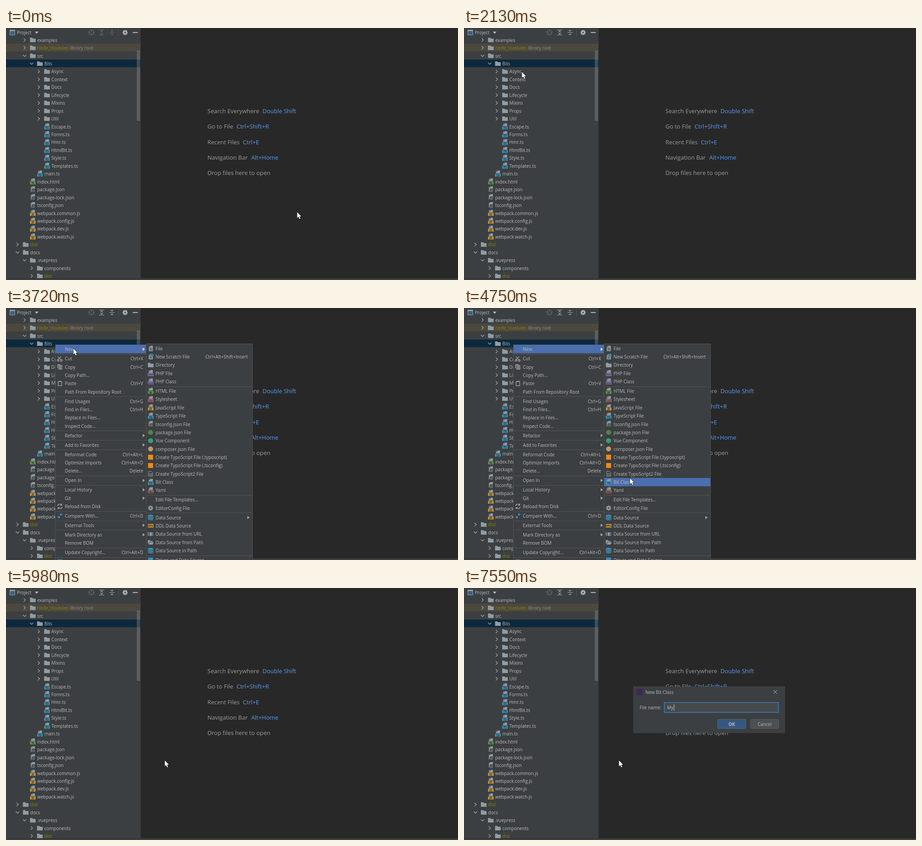
An HTML page with a canvas for the animation above (8000 ms loop, 1002 px wide and 559 px high).

```html
<!DOCTYPE html>
<html lang="en">
<head>
<meta charset="utf-8">
<title>New class from the project tree</title>
<style>
html, body { margin: 0; width: 100%; height: 100%; overflow: hidden; background: #282828; }
canvas { display: block; }
</style>
</head>
<body>
<canvas id="stage" width="1002" height="559"></canvas>
<script>
const ctx = document.getElementById('stage').getContext('2d');
const LOOP = 8000;
const PANEL = '#3c3f41', LINE = '#515354', TEXT = '#bbbbbb', GREY = '#919da5', OLIVE = '#848504';
const BLUE = '#3c8fb5', GOLD = '#c2923c', GREEN = '#5b8f45', RED = '#b0656b', VIOLET = '#8d7bb5', SELECT = '#4b6eaf';

function box(x, y, w, h, color) {
  ctx.fillStyle = color;
  ctx.fillRect(x, y, w, h);
}

function text(str, x, y, color = TEXT, { size = 10, align = 'left', weight = 400 } = {}) {
  ctx.font = `${weight} ${size}px "Open Sans", "Noto Sans", sans-serif`;
  ctx.textAlign = align;
  ctx.fillStyle = color;
  ctx.fillText(str, x, Math.round(y));
}

function fill(x, y, d, color) {
  ctx.save();
  ctx.translate(x, y);
  ctx.fillStyle = color;
  ctx.fill(new Path2D(d));
  ctx.restore();
}

function stroke(x, y, d, color = '#afb1b3', width = 1.2) {
  ctx.save();
  ctx.translate(x, y);
  ctx.strokeStyle = color;
  ctx.lineWidth = width;
  ctx.stroke(new Path2D(d));
  ctx.restore();
}

function disc(x, y, r, color) {
  ctx.fillStyle = color;
  ctx.beginPath();
  ctx.arc(x, y, r, 0, 7);
  ctx.fill();
}

// Icons: x is the left edge, y the middle of the row.
const folder = (x, y) => fill(x, y, 'M0-5h5l1.5 2h6v8h-12.5z', GREY);
const page = (x, y) => fill(x, y, 'M5-6h6v12h-9v-9h3zM4-6v2h-2z', GREY);

const badge = (label, color) => (x, y) => {
  fill(x, y, 'M5-7h6v6h-9v-3h3zM4-7v2.6h-2.6z', GREY);
  box(x, y - .3, 12.5, 6.6, color);
  text(label, x + 6.3, y + 5.4, '#263138', { size: label.length > 2 ? 5.5 : 6.5, align: 'center', weight: 700 });
};

function json(x, y) {
  fill(x, y, 'M5-7h6v6h-9v-3h3zM4-7v2.6h-2.6zM2-1h2v6h-2z', GREY);
  disc(x + 8, y + 2.3, 4.4, PANEL);
  text('{}', x + 8, y + 4.8, GREY, { size: 7.5, align: 'center', weight: 700 });
}

function lines(x, y) {
  page(x, y);
  for (const dy of [-1, 1, 3]) box(x + 4, y + dy, 5, 1, PANEL);
}

function clockPage(x, y) {
  lines(x, y);
  disc(x + 9, y - 3, 3.6, BLUE);
  stroke(x + 9, y - 3, 'M0-2v2h2', PANEL, 1);
}

function cylinder(x, y) {
  fill(x, y, 'M0-4c0-3 12-3 12 0v8c0 3-12 3-12 0z', BLUE);
  for (const dy of [-3, 0, 3]) stroke(x, y + dy, 'M0 0c0 2 12 2 12 0', PANEL, .9);
}

function gear(x, y, color = GREY) {
  for (let i = 0; i < 4; i++) {
    ctx.save();
    ctx.translate(x + 6, y);
    ctx.rotate(i * Math.PI / 4);
    box(-1.2, -5.7, 2.4, 11.4, color);
    ctx.restore();
  }
  disc(x + 6, y, 4.2, color);
  disc(x + 6, y, 1.8, PANEL);
}

const square = color => (x, y) => box(x + .5, y - 5.5, 11, 11, color);
const dot = color => (x, y) => disc(x + 6, y, 5.6, color);
const outline = (d, color, width) => (x, y) => stroke(x, y, d, color, width);

const TS = badge('TS', BLUE), JS = badge('JS', GOLD), HTML = badge('H', GREEN), PHP = badge('PHP', VIOLET);

function fileIcon(name) {
  if (name.endsWith('.ts')) return TS;
  if (name.endsWith('.js')) return JS;
  return name.endsWith('.json') ? json : HTML;
}

const icons = {
  'Cut': outline('M1-5l8 8M1 3l8-8M2 2a2 2 0 1 0 .1 0M9 2a2 2 0 1 0 .1 0'),
  'Copy': outline('M1 3v-8h7M3.5-3h7v8h-7zM5-1h4M5 1h4M5 3h4'),
  'Paste': outline('M2-4h8v9h-8zM4-5h4'),
  'Reload from Disk': outline('M1-1a5 5 0 0 1 9-2M10-6v3.5h-3.5M11 1a5 5 0 0 1-9 2M2 6v-3.5h3.5'),
  'Compare With...': outline('M0 3h5M3 .5l2.5 2.5l-2.5 2.5M12-3h-5M9-5.5l-2.5 2.5l2.5 2.5', '#3e97c4', 1.5),
  'Diagrams': square(BLUE),
  'File': lines,
  'New Scratch File': clockPage,
  'Directory': folder,
  'PHP File': PHP,
  'PHP Class': PHP,
  'HTML File': HTML,
  'Stylesheet': badge('CSS', RED),
  'JavaScript File': JS,
  'TypeScript File': TS,
  'tsconfig.json File': json,
  'package.json File': dot('#4d8546'),
  'Vue Component': dot('#3a9b78'),
  'composer.json File': dot('#b99a72'),
  'Create TypoScript File (.typoscript)': square('#e88c1c'),
  'Create TypoScript File (.tsconfig)': square('#e88c1c'),
  'Create TypoScript2 File': (x, y) => {
    stroke(x, y, 'M1.5-5.5h6l3 3v8h-9z', GREY, 1);
    text('TS', x + 6, y + 4, '#d0837a', { size: 6.5, align: 'center', weight: 700 });
  },
  'Bit Class': TS,
  'Yaml': badge('YML', RED),
  'EditorConfig File': gear,
  'Data Source': cylinder,
  'DDL Data Source': (x, y) => {
    box(x, y - 4, 12.5, 8, GOLD);
    text('DDL', x + 6.3, y + 2.4, '#30291a', { size: 6, align: 'center', weight: 700 });
  },
  'Data Source from URL': (x, y) => {
    box(x, y - 4, 2, 8, GREY);
    fill(x, y, 'M4-4h4v8h-4zM8-3h4v2h-4zM8 1h4v2h-4z', GREY);
  },
  'Data Source from Path': (x, y) => fill(x, y, 'M0-5h4l1.5 2h5v2h-7l-2 4h-1.5zM4 0h9l-2.5 5h-9z', GREY),
  'Data Source in Path': cylinder,
  'Driver and Data Source': square(BLUE)
};

// Tree rows: depth, arrow (> closed, v open, . none), name.
const tree = `1>examples|1>node_modules|1vsrc|2vBits|3>Async|3>Context|3>Docs|3>Lifecycle|3>Mixins|3>Props|3>Util
|3.Escape.ts|3.Forms.ts|3.Hmr.ts|3.HtmlBit.ts|3.Style.ts|3.Templates.ts|2.main.ts|1.index.html|1.package.json
|1.package-lock.json|1.tsconfig.json|1.webpack.common.js|1.webpack.config.js|1.webpack.dev.js|1.webpack.watch.js
|0>dist|0vdocs|1v.vuepress|2>components|2>dist`.replace(/\n/g, '').split('|');

// Menu entries: label, optional =shortcut, > for a submenu, - for a separator.
function layout(list, y) {
  const rows = [];
  for (const item of list.replace(/\n/g, '').split('|')) {
    if (item === '-') {
      rows.push({ line: y - 7.9 });
      y += 2.6;
    } else {
      const [label, keys] = item.replace('>', '').split('=');
      rows.push({ y, label, keys, more: item.endsWith('>') });
      y += 18.36;
    }
  }
  return rows;
}

const contextRows = layout(`New>|-|Cut=Ctrl+X|Copy=Ctrl+C|Copy Path...|Paste=Ctrl+V|Path From Repository Root|-
|Find Usages=Ctrl+G|Find in Files...=Ctrl+H|Replace in Files...|Inspect Code...|-|Refactor>|-|Add to Favorites>|-
|Reformat Code=Ctrl+Alt+L|Optimize Imports=Ctrl+Alt+O|Delete...=Delete|-|Open In>|-|Local History>|Git>
|Reload from Disk|-|Compare With...=Ctrl+D|-|External Tools>|-|Mark Directory as>|Remove BOM|-
|Update Copyright...=Ctrl+Alt+Ö|-|Diagrams>`, 91.4);

const newRows = layout(`File|New Scratch File=Ctrl+Alt+Shift+Insert|Directory|PHP File|PHP Class|-|HTML File|Stylesheet
|JavaScript File|TypeScript File|tsconfig.json File|package.json File|Vue Component|composer.json File
|Create TypoScript File (.typoscript)|Create TypoScript File (.tsconfig)|Create TypoScript2 File|Bit Class|Yaml|-
|Edit File Templates...|EditorConfig File|-|Data Source>|DDL Data Source|Data Source from URL
|Data Source from Path|Data Source in Path|-|Driver and Data Source`, 89.7);

function drawMenu(rows, x, y, right, isActive) {
  box(x, y, right - x, 600, LINE);
  box(x + 1, y + 1, right - x - 2, 600, PANEL);
  for (const row of rows) {
    if (row.line) {
      box(x + 1, Math.round(row.line), right - x - 2, 1, LINE);
      continue;
    }
    const active = isActive(row);
    if (active) box(x + 1, Math.round(row.y - 9.2), right - x - 2, 18.4, SELECT);
    icons[row.label]?.(x + 4.5, row.y);
    text(row.label, x + 21.5, row.y + 4);
    if (row.keys) text(row.keys, right - 11, row.y + 4, TEXT, { align: 'right' });
    if (row.more) fill(right - 12, row.y, 'M0-3.5l5 3.5l-5 3.5z', active ? '#e0e0e0' : '#a5a7a9');
  }
}

function drawHeader(focused) {
  const bright = '#b4b6b8', dim = '#6c6f71', tool = focused ? bright : dim;
  box(8, 4, 12, 12, '#94a0a8');
  box(9, 7, 10, 8, '#35647f');
  text('Project', 24, 14);
  fill(64, 8, 'M0 0h8l-4 5z', bright);
  stroke(189.5, 10, 'M5.5 0a5.5 5.5 0 1 1-11 0a5.5 5.5 0 1 1 11 0M0-6v4M0 6v-4M-6 0h4M6 0h-4', dim);
  stroke(212, 10, 'M-5.5-5.5h11M-5.5 5.5h11M-2.5-1l2.5-2.5l2.5 2.5M-2.5 1l2.5 2.5l2.5-2.5', tool);
  stroke(235, 10, 'M-5.5 0h11M-2.5-5.5l2.5 2.5l2.5-2.5M-2.5 5.5l2.5-2.5l2.5 2.5', tool);
  box(249, 2, 1, 16, LINE);
  gear(258, 10, bright);
  box(281, 9, 11, 2, bright);
}

function drawTree() {
  box(0, 35, 298, 17, '#4d483f');
  box(0, 70, 298, 17, '#0d293e');
  tree.forEach((row, i) => {
    const x = 25.5 + 15.7 * row[0], y = 26.6 + 17.45 * i, name = row.slice(2);
    if (row[1] === '>') stroke(x, y, 'M-2-3.8l3.8 3.8l-3.8 3.8');
    if (row[1] === 'v') stroke(x, y, 'M-3.8-2l3.8 3.8l3.8-3.8');
    (row[1] === '.' ? fileIcon(name) : folder)(x + 12, y);
    text(name, x + 28, y + 4, /^(dist|node_modules)$/.test(name) ? OLIVE : TEXT);
  });
  text('library root', 141.5, 48, '#8c8c8c');
  box(290, 50, 7, 156, 'rgba(166,166,166,.3)');
}

function drawHints() {
  [['Search Everywhere', 568.5, 'Double Shift'], ['Go to File', 511, 'Ctrl+Shift+R'], ['Recent Files', 525, 'Ctrl+E'],
   ['Navigation Bar', 543.5, 'Alt+Home'], ['Drop files here to open', 0, '']].forEach(([label, x, keys], i) => {
    const y = 189.3 + 34.1 * i;
    text(label, 446.5, y, '#9c9c9c', { size: 13 });
    text(keys, x, y, '#589df6', { size: 13 });
  });
}

function button(label, x, w, color, border, weight) {
  ctx.beginPath();
  ctx.roundRect(x + .5, 291.5, w - 1, 20, 2);
  ctx.fillStyle = color;
  ctx.fill();
  ctx.lineWidth = 1;
  ctx.strokeStyle = border;
  ctx.stroke();
  text(label, x + w / 2, 306, TEXT, { align: 'center', weight });
}

function drawDialog(typed, caret) {
  box(375.5, 218.5, 336, 103, '#4a4d4f');
  box(376, 219, 335, 102, PANEL);
  box(382, 224, 14, 14, '#3b2a55');
  text('New Bit Class', 402, 235);
  stroke(690, 230.5, 'M-4-4l8 8M4-4l-8 8', '#c4c4c4', 1);
  text('File name:', 389.5, 269);
  box(443, 253, 255, 24, '#3d6f9f');
  box(445, 255, 251, 20, '#45494a');
  text(typed, 450, 269);
  if (caret) box(450 + Math.round(ctx.measureText(typed).width + (typed ? .7 : 0)), 258, 1, 14, '#d0d0d0');
  button('OK', 562, 63, '#365880', '#4c708c', 700);
  button('Cancel', 635, 63, '#4c5052', '#5e6060', 400);
}

// Pointer moves: first step, last step, step count, end point.
const moves = [
  [180, 280, 2, 643, 406], [750, 940, 3, 709, 526], [1035, 1510, 6, 442, 342],
  [1590, 2130, 7, 128, 97], [2230, 2230, 1, 118, 88], [2430, 2430, 1, 109.5, 82],
  [3460, 3720, 4, 149, 89.5], [4190, 4190, 1, 149, 87.5], [4390, 4480, 2, 322, 96],
  [4570, 4750, 3, 367.5, 377], [5130, 5310, 3, 351.5, 382], [6530, 6630, 2, 343, 382]
];

function pointerAt(t) {
  let x = 645, y = 408;
  for (const [start, end, steps, toX, toY] of moves) {
    if (t < start) break;
    const done = t >= end ? 1 : (1 + Math.floor((t - start) / (end - start) * (steps - 1))) / steps;
    x += (toX - x) * done;
    y += (toY - y) * done;
  }
  return [x, y];
}

function drawPointer(x, y, clicking) {
  if (clicking) disc(x, y, 10.5, 'rgba(255,255,0,.47)');
  const arrow = 'M.5.5v13l3-2.7l2.1 4.9l2.1-.9l-2.1-4.8h4z';
  stroke(x, y, arrow, '#111', 1.4);
  fill(x, y, arrow, '#fff');
}

function draw(t) {
  const [px, py] = pointerAt(t);
  const within = (from, to) => t >= from && t < to;

  box(0, 0, 1002, 559, '#282828');
  box(0, 0, 298, 559, PANEL);
  box(298, 0, 1, 559, '#323232');
  drawTree();
  drawHeader(t >= 180);
  drawHints();
  box(0, 555, 1002, 1, '#323232');
  box(0, 556, 1002, 3, PANEL);

  if (within(2980, 5980)) drawMenu(contextRows, 109, 81, 315, row => t >= 3460 && row.label === 'New');
  if (within(3720, 5980)) drawMenu(newRows, 310, 79, 547, row => px > 311 && Math.abs(py - row.y) < 9.18);
  if (t >= 6070) {
    ctx.globalAlpha = Math.min(1, (1 + Math.floor((t - 6070) / 95)) / 3);
    drawDialog(t < 7270 ? '' : t < 7550 ? 'M' : 'My', !within(6630, 7090));
    ctx.globalAlpha = 1;
  }
  drawPointer(px, py, within(2900, 2980) || within(5780, 5980));
}

function tick() {
  draw(performance.now() % LOOP);
  requestAnimationFrame(tick);
}
tick();
</script>
</body>
</html>
```
